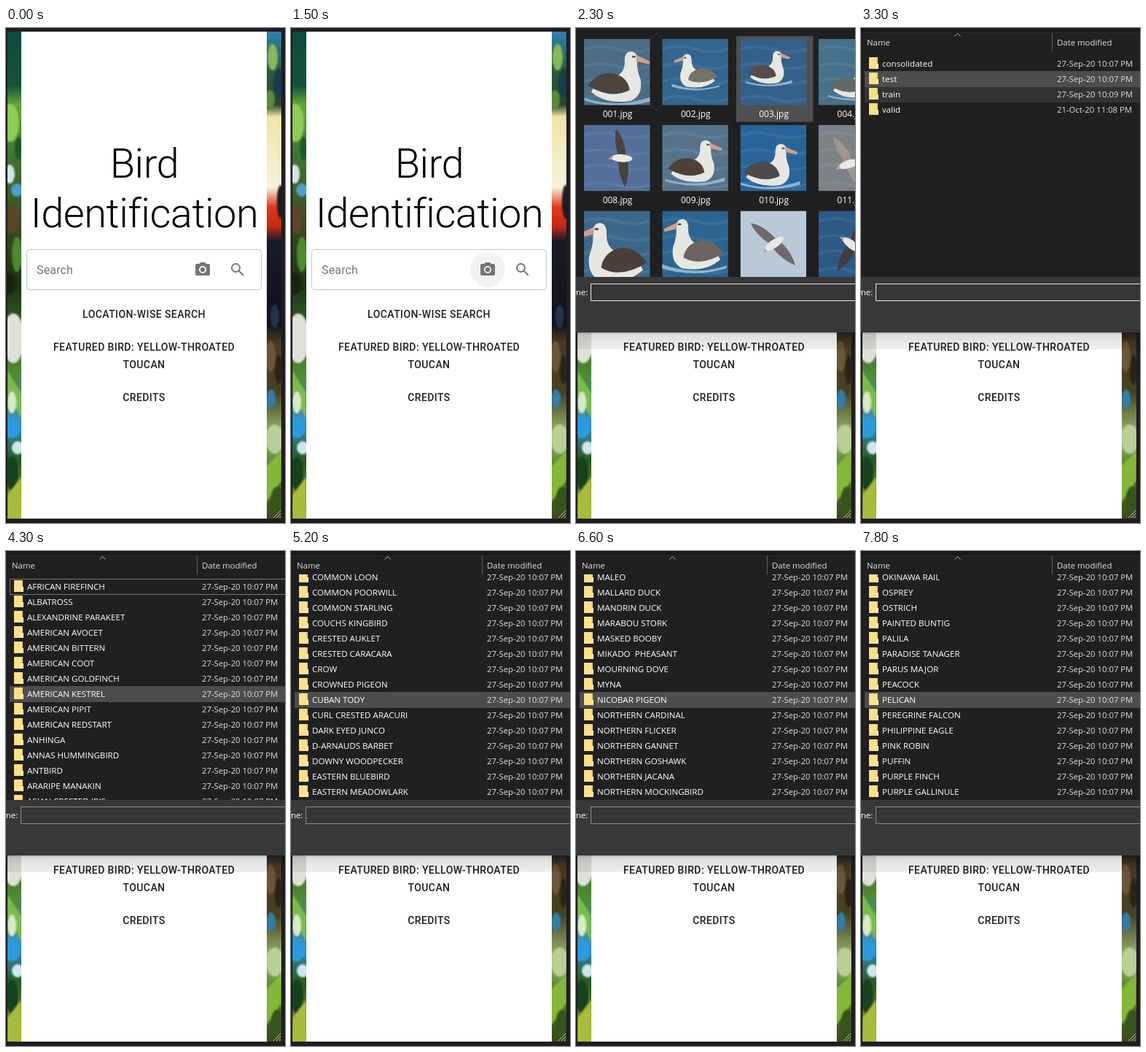
An HTML page that plays this animation: 383 px wide and 678 px high, repeating every 8000 ms.

```html
<!DOCTYPE html>
<html lang="en">
<head>
<meta charset="utf-8">
<title>Bird Identification</title>
<style>
html, body { margin: 0; width: 100%; height: 100%; overflow: hidden; background: #201d22; }
svg { display: block; }
text { white-space: pre; }
.page text { font-family: Roboto, sans-serif; text-anchor: middle; }
.page .title { font-size: 56px; font-weight: 300; letter-spacing: -.00833em; }
.page .link { font-size: 14px; font-weight: 500; letter-spacing: .02857em; fill: #212121; }
.page .hint { font-size: 16px; letter-spacing: .00938em; fill: #757575; text-anchor: start; }
#dialog text { font: 11.6px "Open Sans", sans-serif; fill: #fff; }
#dialog .date { font-size: 11.3px; fill: #dedede; }
#dialog .head { font-size: 11.4px; fill: #dedede; }
#dialog .label { font-size: 12px; text-anchor: middle; }

.anim { animation: 8s step-end infinite; }
#ripple { animation-name: ripple; }
#dialog { animation-name: open; transform-origin: 220px 217px; }
#grid { animation-name: grid; }
#tileHover { animation-name: tile-hover; }
#list { animation-name: list; }
.folders { animation-name: folders; }
#birds { animation-name: birds; }
#scroll { animation-name: scroll; }
#focus { animation-name: focus; }
#hover { animation-name: hover; }
#field { animation-name: field; }
#caret { animation-name: caret; }

@keyframes ripple { 0% { opacity: 0 } 18.75% { opacity: .05 } 20% { opacity: .1 } 22.5% { opacity: 0 } }
@keyframes open {
  0% { opacity: 0; transform: scale(.9) }
  21.25% { opacity: .3; transform: scale(.95) }
  22.5% { opacity: .78; transform: scale(.985) }
  23.75% { opacity: .97; transform: scale(.997) }
  25% { opacity: 1; transform: none }
}
@keyframes grid { 0% { opacity: 1 } 35% { opacity: 0 } }
@keyframes tile-hover { 0% { transform: none } 27.5% { transform: translateY(-117.75px) } }
@keyframes list { 0% { opacity: 0 } 35% { opacity: 1 } }
@keyframes folders { 0% { opacity: 0 } 40% { opacity: 1 } 47.5% { opacity: 0 } }
@keyframes birds { 0% { opacity: 1 } 40% { opacity: 0 } 47.5% { opacity: 1 } }
@keyframes focus { 0% { opacity: 0 } 48.75% { opacity: 1 } }
@keyframes hover {
  0% { opacity: 0; transform: translateY(59px) }
  41.25% { opacity: 1; transform: translateY(59px); fill: #4d4d4d }
  46.25% { opacity: 1; transform: translateY(59px); fill: #777 }
  47.5% { opacity: 0; transform: translateY(59px); fill: #4d4d4d }
  48.75% { opacity: 1; transform: translateY(59px) }
  52.5% { opacity: 1; transform: translateY(122px) }
  53.75% { opacity: 1; transform: translateY(185px) }
  56.25%, 100% { opacity: 1; transform: translateY(193px); fill: #4d4d4d }
}
@keyframes field { 0% { stroke: #e8e8e8 } 46.25% { stroke: #8c8c8c } }
@keyframes caret { 0% { opacity: 1 } 28.75% { opacity: 0 } 35% { opacity: 1 } 40% { opacity: 0 } }
@keyframes scroll {
  0% { transform: none }
  56.25% { transform: translateY(-244px) }
  57.5% { transform: translateY(-433px) }
  60% { transform: translateY(-685px) }
  61.25% { transform: translateY(-874px) }
  63.75% { transform: translateY(-1105px) }
  65% { transform: translateY(-1294px) }
  68.75% { transform: translateY(-1672px) }
  72.5% { transform: translateY(-1840px) }
  73.75% { transform: translateY(-2029px) }
  76.25% { transform: translateY(-2176px) }
  77.5% { transform: translateY(-2323px) }
  81.25% { transform: translateY(-2470px) }
  82.5% { transform: translateY(-2596px) }
  87.5% { transform: translateY(-2785px) }
  88.75% { transform: translateY(-2911px) }
  97.5%, 100% { transform: translateY(-2974px) }
}
</style>
</head>
<body>
<svg width="383" height="678" viewBox="0 0 383 678">
  <defs>
    <clipPath id="photoClip"><path d="M2 5H378V672H2z"/></clipPath>
    <clipPath id="listClip"><path d="M0 32H383V341H0z"/></clipPath>
    <clipPath id="gridClip"><path d="M-40 0H430V341H-40z"/></clipPath>
    <clipPath id="thumbClip"><path d="M0 0H90.5V90.5H0z"/></clipPath>
    <filter id="soft"><feGaussianBlur stdDeviation="1.2"/></filter>
    <linearGradient id="shade" x2="0" y2="1">
      <stop offset="0" stop-opacity=".3"/><stop offset=".15" stop-opacity=".13"/><stop offset="1" stop-opacity=".06"/>
    </linearGradient>
    <linearGradient id="leafL" x2="0" y2="1">
      <stop offset="0" stop-color="#0d4a40"/><stop offset=".11" stop-color="#135238"/>
      <stop offset=".15" stop-color="#62a63a"/><stop offset=".24" stop-color="#3f7a35"/>
      <stop offset=".4" stop-color="#3c4a22"/><stop offset=".52" stop-color="#1c3416"/>
      <stop offset=".7" stop-color="#4f8a33"/><stop offset=".8" stop-color="#3b8ec0"/>
      <stop offset=".88" stop-color="#265b1f"/><stop offset="1" stop-color="#9cae35"/>
    </linearGradient>
    <linearGradient id="leafR" x2="0" y2="1">
      <stop offset="0" stop-color="#2f7fae"/><stop offset=".08" stop-color="#2d5c3c"/>
      <stop offset=".15" stop-color="#27472c"/><stop offset=".175" stop-color="#f0e6a6"/>
      <stop offset=".32" stop-color="#f6f1dc"/><stop offset=".36" stop-color="#e2371d"/>
      <stop offset=".4" stop-color="#c42a17"/><stop offset=".43" stop-color="#171a28"/>
      <stop offset=".6" stop-color="#10131c"/><stop offset=".64" stop-color="#4a3a24"/>
      <stop offset=".74" stop-color="#45421f"/><stop offset=".83" stop-color="#9cba72"/>
      <stop offset=".9" stop-color="#4f7a26"/><stop offset="1" stop-color="#3d4a1c"/>
    </linearGradient>
    <g id="folder">
      <path d="M11 40h11v16h-11z" fill="#ffe08a"/>
      <path d="M21 40h2v16h-2z" fill="#f3cb62"/>
      <path d="M21 49h3v7h-3z" fill="#ffe9a8"/>
    </g>
    <g id="swim">
      <path d="M4 69Q45 82 86 67V72Q45 84 4 72z" fill="#8fb2cd"/>
      <path d="M12 62Q22 44 43 44Q53 38 52 26Q52 16 60 16Q68 17 67 26Q66 36 71 48Q74 66 60 72Q30 77 12 62z" fill="#e6e6e3"/>
      <path d="M8 55Q20 38 40 41Q56 46 58 60Q36 71 8 55z" fill="currentColor"/>
      <path d="M66 20L82 27Q83 31 79 30L66 27z" fill="#d0a08a"/>
      <path d="M61 21h4v2h-4z" fill="#444"/>
    </g>
    <g id="fly">
      <path d="M41 42Q34 20 38 4Q50 16 52 42Q60 62 51 87Q40 70 41 42z" fill="currentColor"/>
      <path d="M32 43Q42 37 58 43Q65 47 58 50Q45 54 32 48z" fill="#e9e8e4"/>
      <path d="M32 43l-6 4 7 1z" fill="#d0a08a"/>
    </g>
  </defs>

  <g class="page">
    <g clip-path="url(#photoClip)">
      <path d="M2 5H22V672H2z" fill="url(#leafL)"/>
      <path d="M357 5H378V672H357z" fill="url(#leafR)"/>
      <g filter="url(#soft)">
        <ellipse cx="6" cy="130" rx="12" ry="26" fill="#8fcb52"/>
        <ellipse cx="17" cy="165" rx="5" ry="16" fill="#1f5a2c"/>
        <ellipse cx="5" cy="200" rx="7" ry="13" fill="#d5e3e4"/>
        <ellipse cx="15" cy="222" rx="8" ry="9" fill="#4c9fd0"/>
        <ellipse cx="8" cy="262" rx="8" ry="20" fill="#5b4528"/>
        <ellipse cx="15" cy="310" rx="7" ry="24" fill="#4d8b2d"/>
        <ellipse cx="6" cy="350" rx="8" ry="15" fill="#16250f"/>
        <ellipse cx="10" cy="425" rx="15" ry="34" fill="#dfe0d8"/>
        <path d="M2 470L21 500V535L2 500z" fill="#79bd49"/>
        <ellipse cx="8" cy="513" rx="6" ry="15" fill="#d6eac3"/>
        <ellipse cx="8" cy="547" rx="12" ry="15" fill="#2a9bdc"/>
        <ellipse cx="16" cy="575" rx="8" ry="9" fill="#cfe6ee"/>
        <ellipse cx="8" cy="610" rx="9" ry="23" fill="#17431b"/>
        <path d="M2 640L21 615V672H2z" fill="#a9bb3a"/>
        <ellipse cx="366" cy="40" rx="7" ry="18" fill="#86b95a"/>
        <ellipse cx="375" cy="75" rx="8" ry="20" fill="#163c4b"/>
        <ellipse cx="362" cy="98" rx="7" ry="13" fill="#5d8a3b"/>
        <ellipse cx="377" cy="238" rx="5" ry="23" fill="#1b1a20"/>
        <ellipse cx="369" cy="395" rx="6" ry="16" fill="#203347"/>
        <ellipse cx="363" cy="450" rx="7" ry="21" fill="#6d5637"/>
        <ellipse cx="374" cy="468" rx="5" ry="20" fill="#2a2316"/>
        <ellipse cx="364" cy="508" rx="6" ry="13" fill="#337bab"/>
        <ellipse cx="369" cy="563" rx="12" ry="20" fill="#b8cf96"/>
        <path d="M357 600L378 580V620L357 650z" fill="#83b837"/>
        <ellipse cx="372" cy="648" rx="9" ry="20" fill="#35551d"/>
      </g>
    </g>
    <path d="M21 5H358V672H21z" fill="#fff"/>
    <path d="M367 671l10-10M371 671l6-6M375 671l2-2" stroke="#bbb"/>
    <text class="title" x="190" y="205">Bird</text>
    <text class="title" x="190" y="273">Identification</text>
    <rect x="28.5" y="303.5" width="322" height="55" rx="4" fill="none" stroke="#c4c4c4"/>
    <text class="hint" x="42" y="337">Search</text>
    <circle id="ripple" class="anim" cx="270" cy="331" r="24"/>
    <g transform="translate(258 319)" fill="#757575">
      <path fill-rule="evenodd" d="M9 2L7.2 4H4Q2 4 2 6V18Q2 20 4 20H20Q22 20 22 18V6Q22 4 20 4H16.8L15 2zM12 7a5 5 0 0 1 0 10a5 5 0 0 1 0-10z"/>
      <circle cx="12" cy="12" r="3.2"/>
    </g>
    <g transform="translate(306 319)" fill="none" stroke="#757575" stroke-width="2">
      <circle cx="9.5" cy="9.5" r="5.5"/><path d="M13.6 13.6L19.7 19.7"/>
    </g>
    <text class="link" x="189.5" y="397">LOCATION-WISE SEARCH</text>
    <text class="link" x="189.5" y="442">FEATURED BIRD: YELLOW-THROATED</text>
    <text class="link" x="189.5" y="466">TOUCAN</text>
    <text class="link" x="189.5" y="511">CREDITS</text>
  </g>

  <g id="dialog" class="anim">
    <path d="M-40 417H430V440H-40z" fill="url(#shade)"/>
    <path d="M-40 -40H430V341H-40z" fill="#202020"/>
    <path d="M-40 341H430V417H-40z" fill="#383838"/>

    <g id="grid" class="anim" clip-path="url(#gridClip)">
      <rect id="tileHover" class="anim" x="220" y="129" width="105.5" height="117.5" fill="#4f4f4f"/>
      <g id="tiles"></g>
    </g>

    <g id="list" class="anim">
      <path d="M0 0H383V6H0z" fill="#1a1a1a"/>
      <path d="M0 6.5H383" stroke="#2b2b2b"/>
      <text class="head" x="8" y="24">Name</text>
      <text class="head" x="269" y="24">Date modified</text>
      <path d="M262.5 7V32" stroke="#5e5e5e"/>
      <path d="M128.500 11.500l4-4 4 4" fill="none" stroke="#b0b0b0"/>
      <g clip-path="url(#listClip)">
        <path class="anim folders" d="M5 80H383V102H5z" fill="#333"/>
        <rect id="hover" class="anim" x="5" width="378" height="22" fill="#4d4d4d"/>
        <g id="folderRows" class="anim folders"></g>
        <g id="birds" class="anim">
          <g id="scroll" class="anim">
            <rect id="focus" class="anim" x="5.5" y="38.5" width="390" height="21" fill="none" stroke="#777"/>
            <g id="birdRows"></g>
          </g>
        </g>
      </g>
    </g>

    <text x="-4" y="366">me:</text>
    <rect id="field" class="anim" x="20.5" y="350.5" width="420" height="23" fill="#363636" stroke="#e8e8e8"/>
    <path id="caret" class="anim" d="M24.500 354V370" stroke="#fff"/>
  </g>
</svg>
<script>
const species = `AFRICAN FIREFINCH,ALBATROSS,ALEXANDRINE PARAKEET,AMERICAN AVOCET,AMERICAN BITTERN,AMERICAN COOT,AMERICAN GOLDFINCH,AMERICAN KESTREL,AMERICAN PIPIT,AMERICAN REDSTART,ANHINGA,ANNAS HUMMINGBIRD,ANTBIRD,ARARIPE MANAKIN,ASIAN CRESTED IBIS,BALD EAGLE,BALI STARLING,BALTIMORE ORIOLE,BANANAQUIT,BAR-TAILED GODWIT,BARN OWL,BARN SWALLOW,BARRED PUFFBIRD,BAY-BREASTED WARBLER,BEARDED BARBET,BELTED KINGFISHER,BIRD OF PARADISE,BLACK FRANCOLIN,BLACK SKIMMER,BLACK SWAN,BLACK TAIL CRAKE,BLACK THROATED WARBLER,BLACK VULTURE,BLACK-CAPPED CHICKADEE,BLACK-NECKED GREBE,BLACK-THROATED SPARROW,BLACKBURNIAM WARBLER,BLUE GROUSE,BLUE HERON,BOBOLINK,BROWN NOODY,BROWN THRASHER,CACTUS WREN,CALIFORNIA CONDOR,CALIFORNIA GULL,CALIFORNIA QUAIL,CANARY,CAPE MAY WARBLER,CAPUCHINBIRD,CARMINE BEE-EATER,CASPIAN TERN,CASSOWARY,CHARA DE COLLAR,CHIPPING SPARROW,CHUKAR PARTRIDGE,CINNAMON TEAL,COCK OF THE ROCK,COCKATOO,COMMON FIRECREST,COMMON GRACKLE,COMMON HOUSE MARTIN,COMMON LOON,COMMON POORWILL,COMMON STARLING,COUCHS KINGBIRD,CRESTED AUKLET,CRESTED CARACARA,CROW,CROWNED PIGEON,CUBAN TODY,CURL CRESTED ARACURI,DARK EYED JUNCO,D-ARNAUDS BARBET,DOWNY WOODPECKER,EASTERN BLUEBIRD,EASTERN MEADOWLARK,EASTERN ROSELLA,EASTERN TOWEE,ELEGANT TROGON,ELLIOTS PHEASANT,EMPEROR PENGUIN,EMU,EURASIAN MAGPIE,EVENING GROSBEAK,FLAME TANAGER,FLAMINGO,FRIGATE,GILA WOODPECKER,GILDED FLICKER,GLOSSY IBIS,GOLD WING WARBLER,GOLDEN CHLOROPHONIA,GOLDEN EAGLE,GOLDEN PHEASANT,GOLDEN PIPIT,GOULDIAN FINCH,GRAY CATBIRD,GRAY PARTRIDGE,GREEN JAY,GREY PLOVER,GUINEAFOWL,GYRFALCON,HARPY EAGLE,HAWAIIAN GOOSE,HOODED MERGANSER,HOOPOES,HORNBILL,HOUSE FINCH,HOUSE SPARROW,HYACINTH MACAW,IMPERIAL SHAQ,INCA TERN,INDIGO BUNTING,JABIRU,JAVAN MAGPIE,KILLDEAR,KING VULTURE,KIWI,KOOKABURRA,LARK BUNTING,LEARS MACAW,LILAC ROLLER,LONG-EARED OWL,MALEO,MALLARD DUCK,MANDRIN DUCK,MARABOU STORK,MASKED BOOBY,MIKADO  PHEASANT,MOURNING DOVE,MYNA,NICOBAR PIGEON,NORTHERN CARDINAL,NORTHERN FLICKER,NORTHERN GANNET,NORTHERN GOSHAWK,NORTHERN JACANA,NORTHERN MOCKINGBIRD,NORTHERN PARULA,NORTHERN RED BISHOP,OCELLATED TURKEY,OKINAWA RAIL,OSPREY,OSTRICH,PAINTED BUNTIG,PALILA,PARADISE TANAGER,PARUS MAJOR,PEACOCK,PELICAN,PEREGRINE FALCON,PHILIPPINE EAGLE,PINK ROBIN,PUFFIN,PURPLE FINCH,PURPLE GALLINULE`.split(',');

const $ = id => document.getElementById(id);

const row = (name, i, date = '27-Sep-20 10:07 PM') =>
  `<g transform="translate(0 ${21 * i})"><use href="#folder"/><text x="29" y="52.500">${name}</text><text class="date" x="269" y="52.500">${date}</text></g>`;

$('birdRows').innerHTML = species.map((name, i) => row(name, i)).join('');
$('folderRows').innerHTML = row('consolidated', 0) + row('test', 1) +
  row('train', 2, '27-Sep-20 10:09 PM') + row('valid', 3, '21-Oct-20 11:08 PM');

// Each tile: water, wing colour, bird shape, placement inside the thumbnail
const flip = 'translate(90 0) scale(-1 1)';
const tiles = [
  ['#4a6c86', '#4c443f', 'swim', 'translate(-4 -2) scale(1.15 1.2)'],
  ['#33658f', '#77716c', 'swim', flip + ' translate(8 8) scale(.8)'],
  ['#33608a', '#544d4b', 'swim', 'translate(4 4) scale(.78)'],
  ['#46708b', '#5f6a63', 'swim', 'translate(10 18) scale(.85)'],
  ['#546f9a', '#4b423f', 'fly', 'translate(8 2) scale(.95)'],
  ['#56738a', '#4f4038', 'swim', 'translate(0 5)'],
  ['#28649a', '#4e4a4b', 'swim', 'translate(-4 10)'],
  ['#7c8288', '#a3958a', 'fly', 'translate(-4 8) rotate(-20 45 45)'],
  ['#3d678a', '#4a403a', 'swim', flip + ' translate(-6 -6) scale(1.25 1.4)'],
  ['#2b648f', '#6b6461', 'swim', flip + ' translate(-3 -8) scale(1.1 1.2)'],
  ['#b9c9d8', '#6f6a69', 'fly', 'rotate(-38 45 45)'],
  ['#2c5a84', '#453c3c', 'fly', 'rotate(35 45 45)']
];
$('tiles').innerHTML = tiles.map(([sea, wing, bird, place], i) => {
  const col = i % 4, line = i >> 2;
  const name = String(col + 1 + 7 * line).padStart(3, '0') + '.jpg';
  const waves = [14, 37, 58, 82].map(y => `<path d="M0 ${y}q22 -7 45 0t46 0" stroke="#a9c9e2" stroke-opacity=".1" stroke-width="4" fill="none"/>`).join('');
  return `<g transform="translate(${11 + 107.3 * col} ${15 + 117.75 * line})"><g clip-path="url(#thumbClip)"><path d="M0 0H91V91H0z" fill="${sea}"/>${waves}<use href="#${bird}" transform="${place}" color="${wing}"/></g><text class="label" x="46" y="107">${name}</text></g>`;
}).join('');
</script>
</body>
</html>
```
